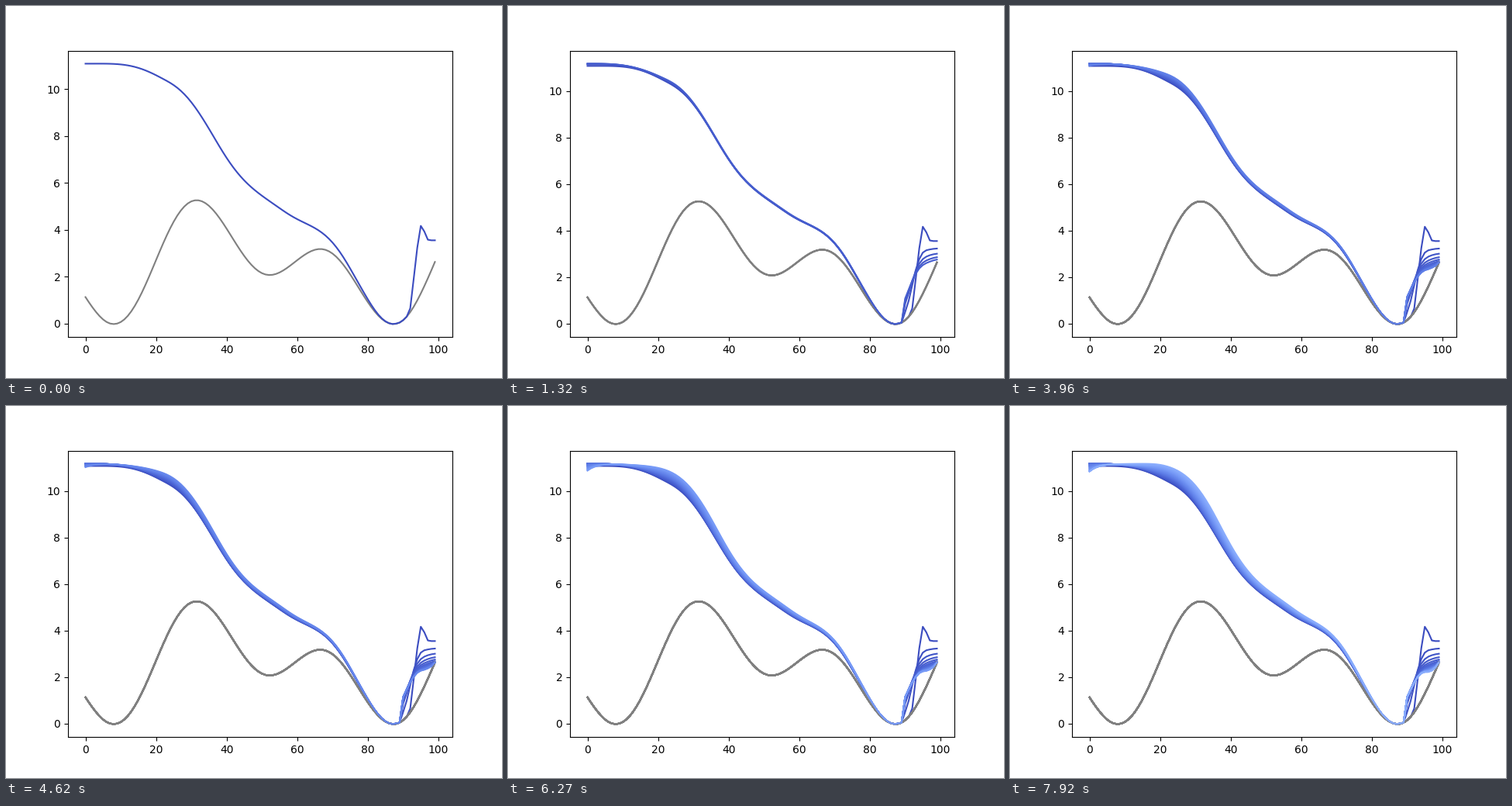
These frames come from a looping animation (640x480 px, 8 s). A matplotlib script:

```python
import numpy as np
import matplotlib.pyplot as plt
from matplotlib.animation import FuncAnimation

STEP = 330       # ms between two added curves
TICK = 40        # ms per drawn frame
LOOP = 8000
COUNT = LOOP // STEP + 1
FLOOR = -0.02
x = np.arange(100)


def hermite(knots, t):
    """Piecewise quintic through (position, value, slope, curvature) knots."""
    out = np.zeros(len(t))
    for (a, *da), (b, *db) in zip(knots, knots[1:]):
        rows = []
        for s in (0.0, b - a):
            rows += [[s**n for n in range(6)],
                     [n * s**max(n - 1, 0) for n in range(6)],
                     [n * (n - 1) * s**max(n - 2, 0) for n in range(6)]]
        coef = np.linalg.solve(np.array(rows), np.array(da + db))
        part = (t >= a) & (t <= b)
        out[part] = np.polyval(coef[::-1], t[part] - a)
    return out


# Hills and valleys: the extrema and both ends
terrain = hermite([
    (0, 1.13, -0.235, 0.015),
    (8, FLOOR, 0, 0.042),
    (31.5, 5.26, 0, -0.042),
    (52.2, 2.07, 0, 0.032),
    (66.5, 3.18, 0, -0.031),
    (87.3, FLOOR, 0, 0.041),
    (99, 2.63, 0.36, 0.012),
], x)

# Descent: the inflections of the first and of the last curve
FIRST = np.array([
    (0, 11.08, 0, 0),
    (22, 10.43, -0.08, 0),
    (36.5, 7.92, -0.255, 0),
    (55, 4.92, -0.105, 0),
    (76, 2.08, -0.265, 0),
    (87.3, FLOOR, 0, 0.041),
])
LAST = np.array([
    (0, 11.18, 0, 0),
    (20, 11.13, -0.025, -0.01),
    (37, 8.52, -0.29, 0),
    (57, 5.02, -0.11, 0),
    (76, 2.18, -0.28, 0),
    (87.3, FLOOR, 0, 0.041),
])
EASE = np.array([0, 1, 1.8, 1.3, 1.3, 1])


def bump(center, width):
    return np.exp(-((x - center) / width) ** 2)


def descent(k):
    p = (k / (COUNT - 1)) ** EASE
    p[0] = 1 - np.exp(-k)          # the start settles at once
    knots = FIRST + (LAST - FIRST) * p[:, None]
    sag = 0.33 * np.clip((k - 9) / 11, 0, 1)
    return hermite(knots.tolist(), x) - sag * np.exp(-x / 2.5)


def tail(k):
    e = 1 - np.exp(-k / 2)
    end = 2.6 + 0.95 * np.exp(-k / 2.5)
    rise = end / (1 + np.exp((92.9 - 2.4 * e - x) / (0.6 + 1.4 * e)))
    overshoot = 0.75 * np.exp(-3 * k) * bump(95.2, 1)
    return rise + overshoot - 0.25 * k / COUNT * bump(96.5, 2)


def curve(k):
    return np.maximum(np.where(x < 90, descent(k), tail(k)), terrain)


curves = [curve(k) for k in range(COUNT)]
tops = np.maximum.accumulate([c.max() for c in curves])
low = terrain.min()

fig, ax = plt.subplots(figsize=(6.4, 4.8), dpi=100)
pairs = []
for k, c in enumerate(curves):
    ground, = ax.plot(x, terrain, color="gray")
    line, = ax.plot(x, c, color=plt.cm.coolwarm(k / 100))
    pairs.append((ground, line))


def draw(frame):
    # a change that falls inside a tick shows from the start of that tick
    k = min((frame * TICK + TICK - 10) // STEP, COUNT - 1)
    for j, pair in enumerate(pairs):
        for artist in pair:
            artist.set_visible(j <= k)
    pad = 0.05 * (tops[k] - low)
    ax.set_ylim(low - pad, tops[k] + pad)
    return [artist for pair in pairs for artist in pair]


anim = FuncAnimation(fig, draw, frames=LOOP // TICK, interval=TICK,
                     repeat=True, repeat_delay=0, blit=False)
plt.show()
```
